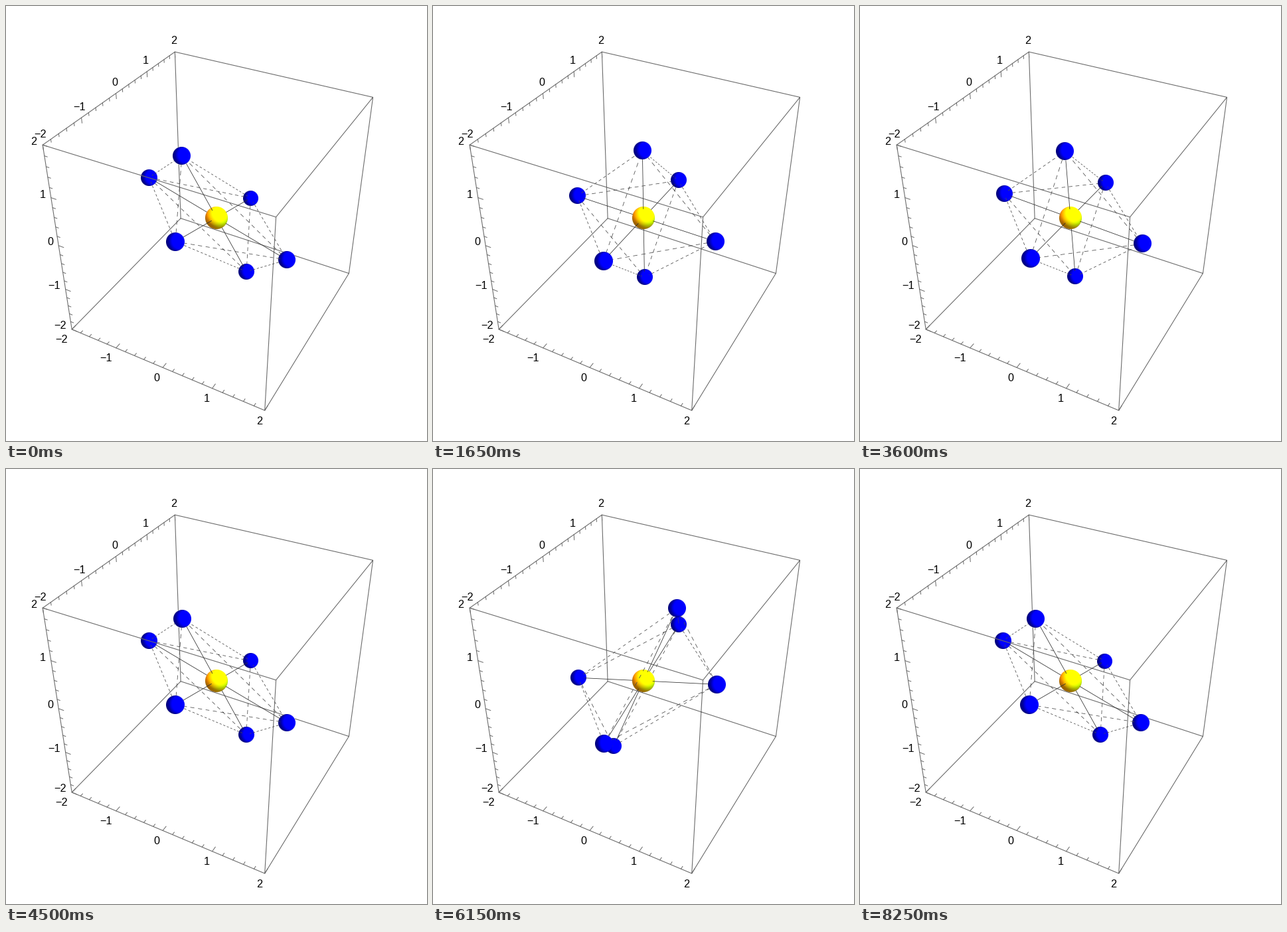
A matplotlib script for the animation above (9000 ms loop, 634 by 655 pixels).

```python
import itertools

import matplotlib.pyplot as plt
import numpy as np
from matplotlib.animation import FuncAnimation

W, H, DPI = 634, 655, 100
PX = 72 / DPI
FRAMES, STEP_MS = 60, 150
HOLD, MOVING = 5, 50

# Perspective camera looking at the middle of the box
CAMERA = np.array([5.2, -9.6, 8.0])
DIST = np.linalg.norm(CAMERA)
FORWARD = -CAMERA / DIST
RIGHT = np.cross(FORWARD, [0, 0, 1])
RIGHT /= np.linalg.norm(RIGHT)
UP = np.cross(RIGHT, FORWARD)
ZOOM, MID_X, MID_Y = 1130, 317, 319

BOND = np.sqrt(2)
SWING = 0.427
R_CORE, R_ATOM = 0.2, 0.15
RADII = np.array([R_CORE] + [R_ATOM] * 6)
DASH, GAP = 0.08, 0.06
SAMPLES = 320

# Atoms on the axes in the order +x, -x, +y, -y, +z, -z
AXES = np.array([s * np.eye(3)[k] for k in range(3) for s in (1, -1)])
SHEAR = np.array([[0, 0, 1], [0, 0, 1], [1, 1, 0]])
DRIFT = AXES @ SHEAR
EDGES = [(a, b) for a, b in itertools.combinations(range(6), 2) if a // 2 != b // 2]

CORNERS = np.array(list(itertools.product((-2, 2), repeat=3)), float)
BOX = [(a, b) for a, b in itertools.combinations(CORNERS, 2) if np.sum(a != b) == 1]


def depth(p):
    return DIST + p @ FORWARD


def project(p):
    d = depth(p)
    return np.stack([MID_X + ZOOM * (p @ RIGHT) / d,
                     MID_Y - ZOOM * (p @ UP) / d], axis=-1)


def atoms(frame):
    k = np.clip(frame - HOLD, 0, MOVING - 1)
    u = -np.cos(4 * np.pi * k / (MOVING - 1))
    return AXES * BOND + SWING * u * DRIFT


def hidden(p, centers):
    """True where a sphere stands between the camera and the point."""
    ray = p - CAMERA
    length2 = np.sum(ray ** 2, axis=-1)
    result = np.zeros(p.shape[:-1], bool)
    for c, r in zip(centers - CAMERA, RADII):
        b = ray @ c
        disc = b ** 2 - length2 * (c @ c - r * r)
        near = (b - np.sqrt(np.maximum(disc, 0))) / length2
        result |= (disc > 0) & (near < 0.999)
    return result


def trace(pairs, centers, dashed=False):
    """Screen path of the visible parts of all segments."""
    start, end = (np.array(side) for side in zip(*pairs))
    t = np.linspace(0, 1, SAMPLES)[None, :, None]
    p = start[:, None] + t * (end - start)[:, None]
    xy = project(p)
    mask = hidden(p, centers)
    if dashed:
        along = t[..., 0] * np.linalg.norm(end - start, axis=1)[:, None]
        mask |= along % (DASH + GAP) > DASH
    xy[mask] = np.nan
    breaks = np.full((len(pairs), 1, 2), np.nan)
    return np.concatenate([xy, breaks], axis=1).reshape(-1, 2).T


def sphere_texture(color, n=96):
    """Ball lit by tinted lamps from the right, the corner and above."""
    g = (np.arange(n) + 0.5) / n * 2 - 1
    x, y = np.meshgrid(g, -g)
    r = np.hypot(x, y)
    shrink = np.maximum(r, 1)
    normal = np.stack([x / shrink, y / shrink,
                       np.sqrt(np.maximum(1 - r ** 2, 0))], axis=-1)
    light = np.ones((n, n, 3)) * [0.5, 0.32, 0.35]
    lamps = [((0, 0.18, 0.5), (2, 0, 2)), ((0.18, 0.5, 0.18), (2, 2, 3)),
             ((0.5, 0.18, 0), (0, 2, 2)), ((0, 0, 0.18), (0, 0, 2))]
    for tint, place in lamps:
        place = np.array(place) / np.linalg.norm(place)
        light += np.maximum(normal @ place, 0)[..., None] * np.array(tint)
    rgb = np.clip(1.2 * light * color, 0, 1)
    alpha = np.clip((1 - r) * n / 2 + 0.5, 0, 1)
    return np.dstack([rgb, alpha])


fig = plt.figure(figsize=(W / DPI, H / DPI), dpi=DPI, facecolor="white")
ax = fig.add_axes([0, 0, 1, 1])
ax.axis("off")

blue, yellow = sphere_texture((0, 0, 1)), sphere_texture((1, 1, 0))
balls = [ax.imshow(tex, extent=(0, 1, 1, 0), aspect="auto", interpolation="antialiased")
         for tex in [yellow] + [blue] * 6]
ax.set(xlim=(0, W), ylim=(H, 0), autoscale_on=False)


def new_line(color, width):
    return ax.plot([], [], color=color, lw=width * PX, zorder=30,
                   solid_capstyle="butt")[0]


frame_lines = new_line("0.42", 1.1)
bond_lines = new_line("0.2", 0.8)
edge_lines = new_line("0.3", 0.8)


def draw_ticks(origin, axis, inward):
    for k in range(-10, 11):
        p = np.array(origin, float)
        p[axis] = k / 5
        a, b = project(np.array([p, p + np.array(inward) * 0.1]))
        size = 8 if k % 5 == 0 else 4.5
        b = a + (b - a) / np.linalg.norm(b - a) * size
        ax.plot(*zip(a, b), color="0.42", lw=PX, zorder=29)


draw_ticks((0, -2, -2), 0, (0, 1, 0))
draw_ticks((-2, 0, 2), 1, (0, 0, -1))
draw_ticks((-2, -2, 0), 2, (1, 0, 0))

# Label centres for the values -2 to 2 along x, y and z
LABELS = [
    [(83.5, 501), (151, 529), (227, 559), (302, 590.5), (382, 624)],
    [(52, 192), (110, 151), (163.5, 114), (210.5, 81), (253, 51)],
    [(82, 480), (72, 420), (66.5, 354), (55, 283), (42, 203.5)],
]
for row in LABELS:
    for value, (x, y) in zip(range(-2, 3), row):
        ax.text(x, y + 5.8, str(value).replace("-", "\u2212"), ha="center",
                va="baseline", family="Liberation Sans", fontsize=16.3 * PX,
                color="black", zorder=40)


def update(frame):
    pos = atoms(frame)
    centers = np.vstack([np.zeros(3), pos])
    for ball, c, r in zip(balls, centers, RADII):
        x, y = project(c)
        size = ZOOM * r / depth(c)
        ball.set_extent((x - size, x + size, y + size, y - size))
        ball.set_zorder(20 - depth(c))
    frame_lines.set_data(*trace(BOX, centers))
    bond_lines.set_data(*trace([(np.zeros(3), p) for p in pos], centers))
    edge_lines.set_data(*trace([(pos[a], pos[b]) for a, b in EDGES], centers, True))
    return [*balls, frame_lines, bond_lines, edge_lines]


anim = FuncAnimation(fig, update, frames=FRAMES, interval=STEP_MS,
                     repeat=True, repeat_delay=0, blit=False)
plt.show()
```
